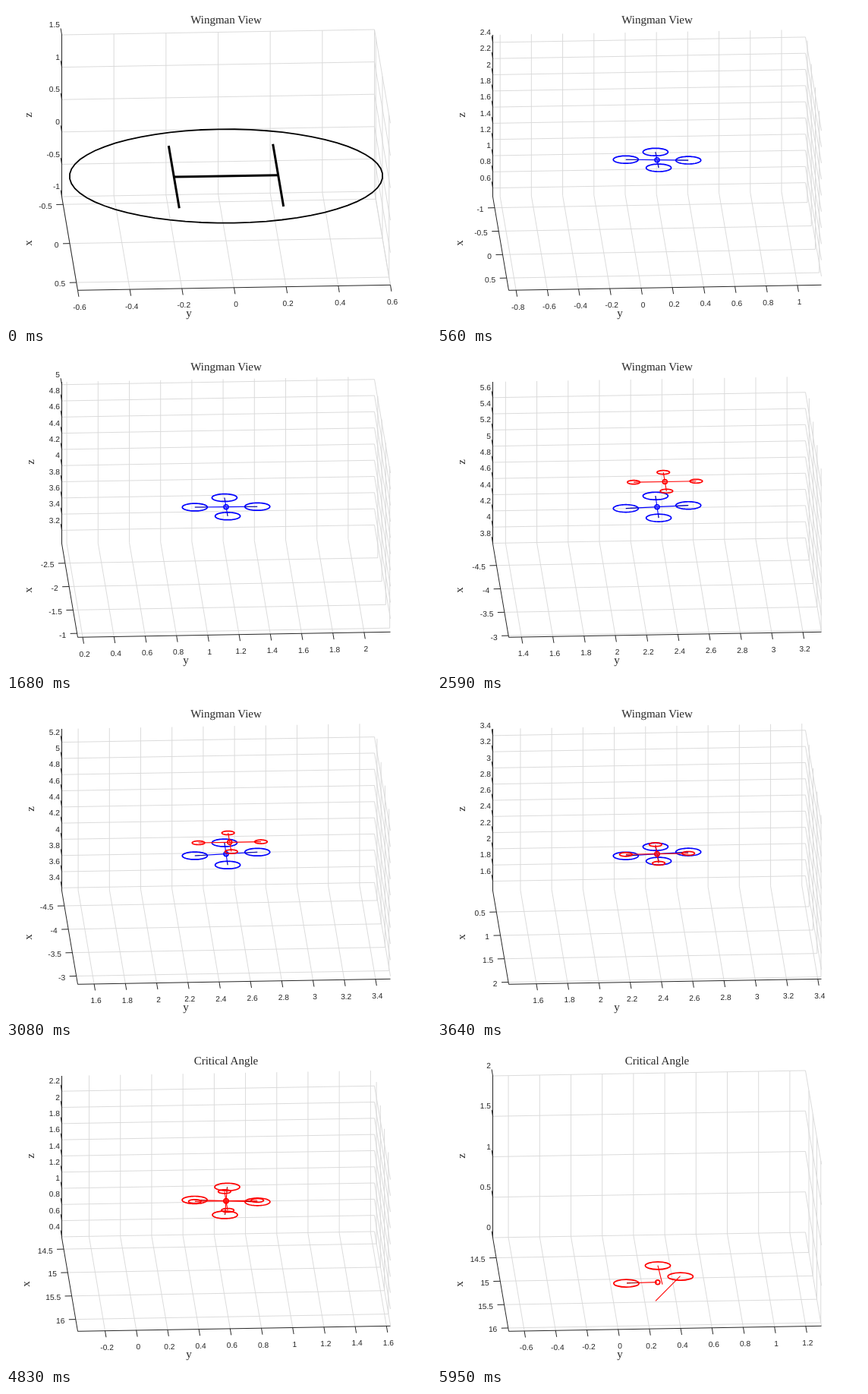
Animation, 560 px wide and 420 px high, one loop 8000 ms. Source, as an HTML page:

```html
<!DOCTYPE html>
<html lang="en">
<head>
<meta charset="utf-8">
<title>Quadcopter flight</title>
<style>
  html, body { margin: 0; width: 100%; height: 100%; overflow: hidden; background: #fff; }
  svg { display: block; width: 560px; height: 420px; text-rendering: geometricPrecision; }
  .tick { font: 10.2px "Liberation Sans", Arial, sans-serif; fill: #262626; }
  .name { font: 15px "Liberation Serif", "Times New Roman", serif; fill: #262626; text-anchor: middle; }
</style>
</head>
<body>
<svg id="stage" viewBox="0 0 560 420"></svg>
<script>
const stage = document.getElementById('stage');
const LOOP = 8000, STEP = 70, LAST = 5460, CRASH = 5390, CRITICAL = 4410;
const BLUE = '#00f', RED = '#f00', AXIS = '#262626', GRID = '#dadada';

// Flight keys: seconds, x, y, z, pitch, roll, yaw
const KEYS = [
  [0, 0, 0, 0, 0, 0, 0],
  [1.05, -0.528, 0.338, 2.725, -0.027, 0.016, 0],
  [1.68, -1.917, 1.168, 4.035, -0.002, 0.003, 0],
  [2.59, -3.965, 2.318, 4.795, 0.02, -0.012, 0],
  [2.9, -4.3, 2.5, 4.7, 0.03, -0.015, 0],
  [3.64, 1.045, 2.423, 2.483, -0.027, -0.017, 0],
  [4.6, 14.9, 0.75, 1.45, 0.04, 0.004, 0.012],
  [4.83, 15.255, 0.625, 1.39, 0.056, 0.008, 0.0175],
  [5.39, 15.09, 0.32, 0, 0, 0, 0],
  [5.46, 15.07, 0.3, 0, 0, 0, 0]
];

const slope = (i, c) => (KEYS[i + 1][c] - KEYS[i][c]) / (KEYS[i + 1][0] - KEYS[i][0]);

// Monotone tangent, so the path never overshoots a key
function tangent(i, c) {
  if (i === 0) return slope(0, c);
  if (i === KEYS.length - 1) return slope(i - 1, c);
  const a = slope(i - 1, c), b = slope(i, c);
  return a * b <= 0 ? 0 : 2 * a * b / (a + b);
}

function flight(t) {
  let i = 0;
  while (i < KEYS.length - 2 && t > KEYS[i + 1][0]) i++;
  const h = KEYS[i + 1][0] - KEYS[i][0];
  const s = (t - KEYS[i][0]) / h, q = 1 - s;
  return [1, 2, 3, 4, 5, 6].map(c =>
    KEYS[i][c] * (1 + 2 * s) * q * q + tangent(i, c) * h * s * q * q +
    KEYS[i + 1][c] * s * s * (3 - 2 * s) - tangent(i + 1, c) * h * s * s * q);
}

// View limits [min, max] for x, y and z
let lim;
const part = (v, k) => (v - lim[k][0]) / (lim[k][1] - lim[k][0]);
function project(x, y, z) {
  const a = part(x, 0), b = part(y, 1), c = part(z, 2);
  return [73.5 + 21 * a + 412 * b, 251 + 123.3 * a - 7 * b - 213 * c];
}

const fix = v => v.toFixed(2);
const line = (points, color, width, extra = '') =>
  `<polyline points="${points.map(p => p.map(fix).join()).join(' ')}" fill="none" ` +
  `stroke="${color}" stroke-width="${width}" ${extra}/>`;
const text = (s, x, y, cls, extra = '') =>
  `<text x="${fix(x)}" y="${fix(y)}" class="${cls}" ${extra}>${s}</text>`;
const circle = (x, y, z, r, color, width) =>
  line(Array.from({ length: 61 }, (_, i) => {
    const a = i * Math.PI / 30;
    return project(x + r * Math.cos(a), y + r * Math.sin(a), z);
  }), color, width);
const hub = (p, color) =>
  `<circle cx="${fix(p[0])}" cy="${fix(p[1])}" r="2.9" fill="none" stroke="${color}" stroke-width="1.7"/>`;

function ticks(k, step) {
  const out = [];
  for (let n = Math.ceil(lim[k][0] / step - 1e-6); n * step <= lim[k][1] + 1e-6; n++) {
    out.push(+(n * step).toFixed(1));
  }
  return out;
}

function axes(zStep, late) {
  const [[x0, x1], [y0, y1], [z0, z1]] = lim;
  const xs = ticks(0, 0.5), ys = ticks(1, 0.2), zs = ticks(2, zStep);
  let grid = '', marks = '';
  const rule = (...pts) => { grid += line(pts.map(p => project(...p)), GRID, 0.95); };
  const mark = (p, dx, dy) => { marks += line([p, [p[0] + dx, p[1] + dy]], AXIS, 1); };

  for (const x of xs) {
    rule([x, y0, z0], [x, y1, z0], [x, y1, z1]);
    const p = project(x, y0, z0);
    mark(p, -9, 0.2);
    marks += text(x, p[0] - 14.5, p[1] + 5.4, 'tick', 'text-anchor="end"');
  }
  for (const y of ys) {
    rule([x1, y, z0], [x0, y, z0], [x0, y, z1]);
    const p = project(x1, y, z0);
    mark(p, 1.4, 8.5);
    marks += text(y, p[0] + 2.5, p[1] + 25.4, 'tick', 'text-anchor="middle"');
  }
  for (const z of zs) {
    rule([x0, y0, z], [x0, y1, z], [x1, y1, z]);
    const p = project(x0, y0, z);
    mark(p, -1.4, -8.5);
    marks += text(z, p[0] - 2.5, p[1] - 9.9, 'tick', 'text-anchor="end"');
  }
  marks += line([project(x0, y0, z1), project(x0, y0, z0), project(x1, y0, z0), project(x1, y1, z0)], AXIS, 1);

  const minus = list => list.some(v => v < 0);
  const xPos = late || minus(xs) ? 30 : xs.some(v => v > 10 && v % 1) ? 27 : 33;
  const zPos = minus(zs) ? 30 : 33;
  const turned = (s, x, y) => text(s, 0, 0, 'name', `transform="translate(${x + 4} ${y}) rotate(-90)"`);
  marks += turned('x', xPos, 312) + turned('z', zPos, 143.5);
  marks += text('y', minus(ys) ? 241 : 237, 409, 'name');
  return grid + marks;
}

function pad() {
  const bar = (a, b) => line([project(...a, 0), project(...b, 0)], '#000', 3);
  return circle(0, 0, 0, 0.6, '#000', 1.8) +
    bar([-0.4, -0.2], [0.4, -0.2]) + bar([-0.4, 0.2], [0.4, 0.2]) + bar([0, -0.2], [0, 0.2]);
}

function quad([x, y, z, pitch = 0, roll = 0, yaw = 0], radius, color) {
  const tips = [
    [-0.2, yaw, pitch], [0.2, -yaw, -pitch],
    [-yaw, -0.2, roll], [yaw, 0.2, -roll]
  ];
  const mid = project(x, y, z);
  let out = '';
  for (const [a, b, c] of tips) {
    const at = [x + a, y + b, z + c];
    const tip = project(...at);
    const inner = tip.map((v, i) => v + (mid[i] - v) * 0.4);
    out += line([mid, tip], color, 1.1);
    if (radius > 0.05) out += line([tip, inner], '#000', 0.8, 'opacity=".55"');
    out += circle(...at, radius, color, 1.7);
  }
  return out + hub(mid, color);
}

function wreck([x, y, z]) {
  const o = project(x, y, z);
  const at = (dx, dy) => [o[0] + dx, o[1] + dy];
  const rotor = (dx, dy) =>
    `<ellipse cx="${fix(o[0] + dx)}" cy="${fix(o[1] + dy)}" rx="16.6" ry="5" fill="none" stroke="${RED}" stroke-width="1.7"/>`;
  return line([at(-40, 1.7), at(0, 0.5)], RED, 1.1) +
    line([at(-40, 1.7), at(-24, 1.2)], '#000', 0.8, 'opacity=".55"') +
    line([at(1, -21.5), at(7, 3.5)], RED, 1.1) +
    line([at(30.5, -7.5), at(-2, 25.3)], RED, 1.1) +
    rotor(-40.5, 2) + rotor(1, -21.3) + rotor(30.8, -7) + hub(at(0.8, 0.6), RED);
}

function render(ms) {
  const pose = flight(ms / 1000);
  const [x, y, z] = pose;
  const base = Math.max(0, z - 1);
  const start = ms < STEP;
  lim = start
    ? [[-0.6, 0.6], [-0.6, 0.6], [-1, 1.5]]
    : [[x - 1, x + 1], [y - 1, y + 1], [base, base + 2]];

  const critical = ms >= CRITICAL;
  let out = axes(start || base === 0 ? 0.5 : 0.2, ms >= 5040);
  if (start || (base === 0 && ms < 1000)) out += pad();
  if (ms >= CRASH) {
    out += wreck(pose);
  } else if (!start) {
    out += quad(pose, 0.08, critical ? RED : BLUE);
    if (ms >= 2450 && ms < 5000) {
      const gap = Math.min(1, Math.max(0, (3500 - ms) / 910));
      out += quad([x, y + 0.05 * gap, z + 0.31 * gap], 0.04, RED);
    }
  }
  out += text(critical ? 'Critical Angle' : 'Wingman View', 290, 23.2, 'name');
  stage.innerHTML = out;
}

let shown = -1;
const begin = performance.now();
function tick() {
  const t = (performance.now() - begin) % LOOP;
  const ms = Math.min(LAST, Math.floor(t / STEP) * STEP);
  if (ms !== shown) render(shown = ms);
  requestAnimationFrame(tick);
}
tick();
</script>
</body>
</html>
```
